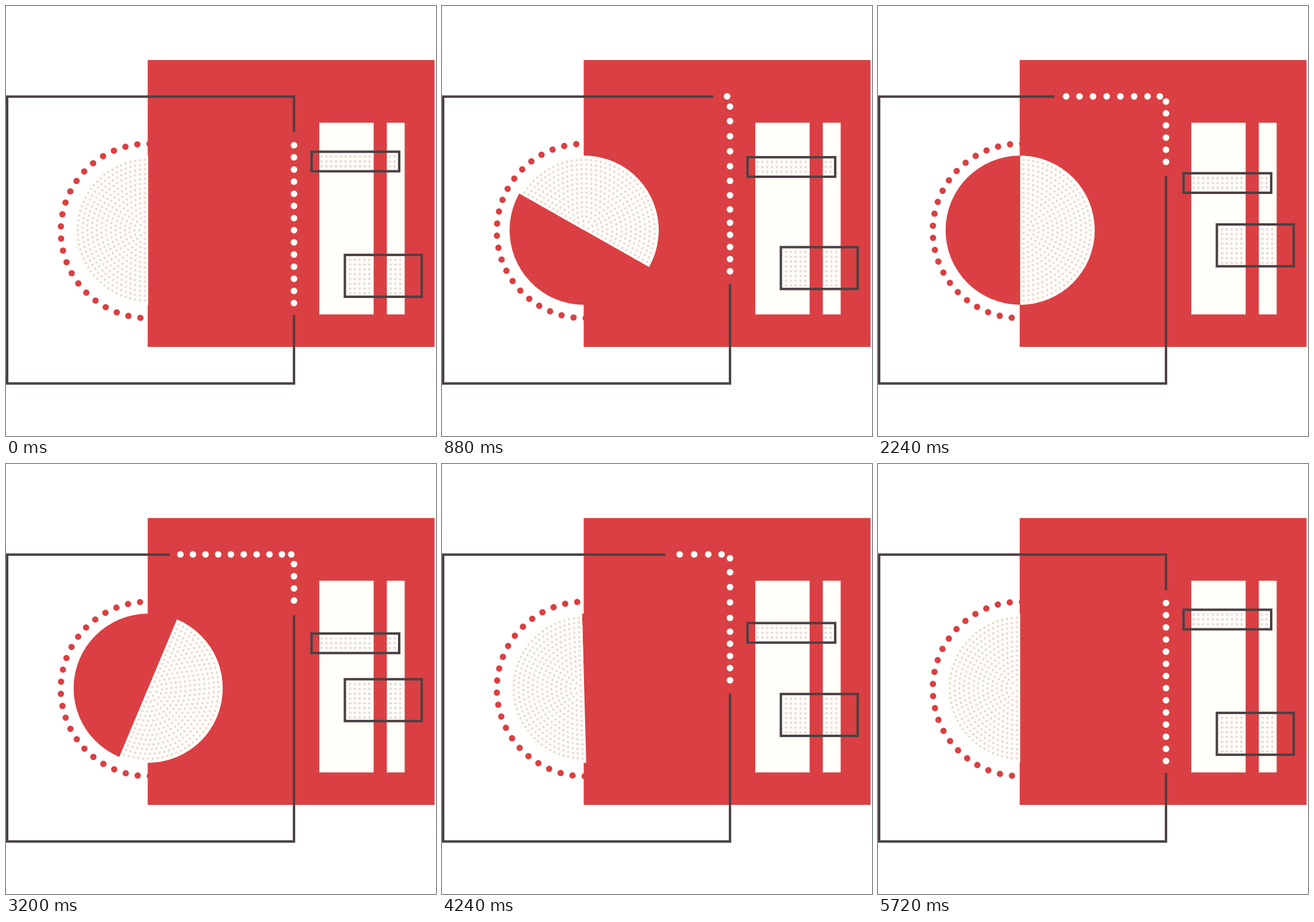
These frames come from a looping animation (748 by 748 pixels, 5.76 s). An HTML page:

```html
<!DOCTYPE html>
<html lang="en">
<head>
<meta charset="utf-8">
<title>Geometric composition</title>
<style>
  html, body { margin: 0; width: 100%; height: 100%; overflow: hidden; background: #fff; }
  svg { display: block; width: 100%; height: 100%; }
</style>
</head>
<body>
<svg id="stage" viewBox="0 0 748 748"></svg>
<script>
const LOOP = 5760, HALF = LOOP / 2, STEP = 40;
const RED = '#da4043', CREAM = '#fffef9', DARK = '#4a4144', SPECK = '#e8dcd8';
const stage = document.getElementById('stage');

function add(tag, attrs, parent = stage) {
  const el = document.createElementNS('http://www.w3.org/2000/svg', tag);
  for (const key in attrs) el.setAttribute(key, attrs[key]);
  parent.appendChild(el);
  return el;
}
const rect = (x, y, width, height, fill) => add('rect', { x, y, width, height, fill });
const dot = (cx, cy, r, fill, parent) => add('circle', { cx, cy, r, fill }, parent);
const outline = { fill: 'none', stroke: DARK, 'stroke-width': 4.2 };

const smooth = u => u * u * (3 - 2 * u);
// Starts at rest and leaves at cruising speed
const launch = u => u * u * (1.9 - 0.9 * u);
const land = u => 1 - launch(1 - u);

// Ring of red dots
const ringX = 247, ringY = 391.3;
const ring = add('g', {});
for (let i = 0; i < 45; i++) {
  const a = (i * 8 + 7) * Math.PI / 180;
  dot(ringX - 151.7 * Math.sin(a), ringY - 151.7 * Math.cos(a), 5.5, RED, ring);
}

rect(246.5, 94, 499, 499, RED);

// Disc: one red half, one speckled half
const discX = 247.3, discY = 390, discR = 129.7;
const disc = add('g', {});
const halfDisc = (sweep, fill) => add('path', {
  d: `M0 ${-discR}A${discR} ${discR} 0 0 ${sweep} 0 ${discR}Z`, fill
}, disc);
halfDisc(1, RED);
halfDisc(0, CREAM);
for (let k = 0; k < 15; k++) {
  const r = 122.5 - 8.2 * k;
  const edge = Math.asin(Math.min(1, 6 / r));
  const span = Math.PI - 2 * edge;
  const n = Math.max(1, Math.round(span * r / 8.4));
  for (let i = 0; i <= n; i++) {
    const a = edge + span * i / n;
    dot(-r * Math.sin(a), -r * Math.cos(a), 2.2, SPECK, disc);
  }
}

rect(545, 203, 94.5, 333.5, CREAM);
rect(662.5, 203, 31, 333.5, CREAM);

// Sliding boxes with speckles over the cream bars
function slider(x, y, width, height, rows, columns) {
  const group = add('g', {});
  for (const [start, count] of columns)
    for (let c = 0; c < count; c++)
      for (let r = 0; r < rows; r++)
        dot(start + c * 8.35, y + 8.5 + r * 8.35, 2.3, SPECK, group);
  add('rect', { x, y, width, height, ...outline }, group);
  return group;
}
const slimBox = slider(531.5, 253.5, 152.5, 34, 3, [[549, 11], [667.7, 2]]);
const tallBox = slider(589.5, 433, 133.7, 72.8, 8, [[598.5, 5], [669, 3]]);

// Open frame whose gap carries white dots around the corner
const left = 2, top_ = 157.7, right = 501, bottom = 656.7;
const frame = add('path', outline);
const beads = Array.from({ length: 14 }, () => dot(0, 0, 5.7, CREAM));

// Position along the frame: negative is below the corner, positive is left of it
const onFrame = s => s < 0 ? [right, top_ - s] : [right - s, top_ - 0.4];

// Distance moved when the corner at distance d is reached at progress t
const travel = (p, d, t, total) => p < t
  ? d * launch(p / t)
  : d + (total - d) * land((p - t) / (1 - t));

function draw(time) {
  const p = 1 - Math.abs(1 - time / HALF);
  const turn = Math.floor(time / HALF) + smooth(Math.min(1, time % HALF / (HALF / 2)));
  disc.setAttribute('transform', `translate(${discX} ${discY}) rotate(${180 * turn})`);
  ring.setAttribute('transform', `rotate(${-40 * time / LOOP} ${ringX} ${ringY})`);
  slimBox.setAttribute('transform', `translate(0 ${42.8 * smooth(p)})`);
  tallBox.setAttribute('transform', `translate(0 ${-60.7 * smooth(p)})`);

  beads.forEach((bead, i) => {
    const start = 84.5 + 21.12 * i;
    const moved = travel(p, Math.min(start, 274.5), Math.min(0.29 + 0.064 * i, 0.855), 291);
    const [x, y] = onFrame(moved - start);
    bead.setAttribute('cx', x);
    bead.setAttribute('cy', y);
  });

  const tail = bottom - 119.2 - 0.983 * travel(p, 274.5, 0.855, 291);
  const lead = travel(p, 62, 0.22, 286) - 62;
  const end = lead < 0 ? `H${right}V${top_ - lead}` : `H${right - lead}`;
  frame.setAttribute('d', `M${right} ${tail}V${bottom}H${left}V${top_}${end}`);
}

const begin = performance.now();
function tick() {
  const time = (performance.now() - begin) % LOOP;
  draw(Math.floor(time / STEP) * STEP);
  requestAnimationFrame(tick);
}
tick();
</script>
</body>
</html>
```
